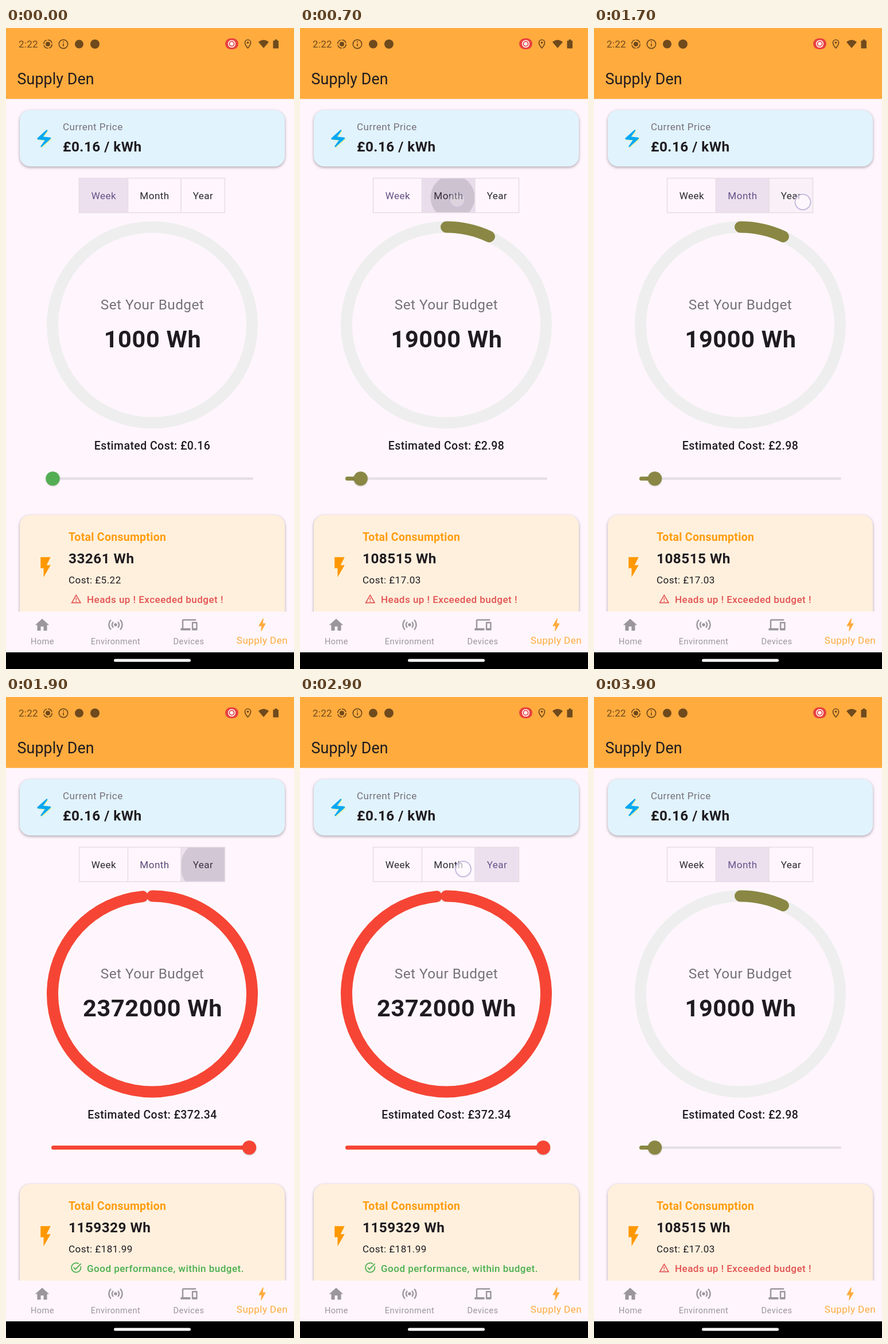
Write an HTML page that moves like this. It is 502 px wide and 1116 px high and loops after 4000 ms.

```html
<!DOCTYPE html>
<html lang="en">
<head>
<meta charset="utf-8">
<title>Supply Den</title>
<style>
  html, body { margin: 0; width: 100%; height: 100%; overflow: hidden; background: #fef6fc; }
  svg { display: block; width: 502px; height: 1116px; }
  text { font-family: Roboto, sans-serif; letter-spacing: .43px; fill: #1f1b20; white-space: pre; }
  .mid { text-anchor: middle; }
  .s { font-size: 17.1px; }
  .m { font-size: 19.5px; font-weight: 500; }
  .l { font-size: 24.4px; }
  .xl { font-size: 41.5px; font-weight: 700; letter-spacing: .65px; }
  .nav { font-size: 14.6px; fill: #9b969c; }
  .b { font-weight: 700; }
  .w5 { font-weight: 500; }
  .grey { fill: #77717a; }
  .card { filter: drop-shadow(0 2.5px 2px rgba(60, 45, 70, .28)) drop-shadow(0 1px 2.5px rgba(60, 45, 70, .16)); }
  .thumb { filter: drop-shadow(0 1px 1px rgba(0, 0, 0, .22)); }
  .status { fill: #6f4a1c; }
  .line { fill: none; stroke: #6f4a1c; stroke-width: 1.7; }
</style>
</head>
<body>
<svg viewBox="0 0 502 1116">
  <defs><clipPath id="clip"><rect id="clipBox" y="262" height="59.5"/></clipPath></defs>
  <rect width="502" height="1116" fill="#fef6fc"/>
  <rect width="502" height="123.5" fill="#ffab3e"/>

  <!-- status bar -->
  <text x="22" y="34" class="s status" style="letter-spacing:.2px">2:22</text>
  <circle cx="73" cy="28" r="7.2" class="line" stroke-dasharray="9.3 2"/>
  <circle cx="73" cy="28" r="4" class="status"/>
  <circle cx="100" cy="28" r="7.7" class="line"/>
  <path d="M100 27v5M100 23.3v2" class="line"/>
  <circle cx="127.5" cy="28" r="7.5" class="status"/>
  <circle cx="155" cy="28" r="8" class="status"/>
  <rect x="382" y="18" width="23" height="19" rx="9.5" fill="#e8413f"/>
  <circle cx="393.5" cy="27.5" r="5.8" fill="none" stroke="#fff" stroke-width="1.5"/>
  <circle cx="393.5" cy="27.5" r="3.2" fill="#fff"/>
  <path d="M421.5 20.5c-3 0-5 2.3-5 5 0 4 5 9.5 5 9.5s5-5.5 5-9.5c0-2.7-2-5-5-5z" class="line"/>
  <circle cx="421.5" cy="25.5" r="1.8" class="status"/>
  <path d="M440 24.5Q449 17 458 24.5L449 35z" class="status"/>
  <path d="M468.5 20h4v2h2.5v13.5h-9.5V22h3z" class="status"/>
  <text x="19.5" y="98" style="font-size:26.8px;letter-spacing:.1px">Supply Den</text>

  <!-- price -->
  <rect x="24" y="143" width="462" height="98" rx="18" fill="#e1f3fd" class="card"/>
  <g id="priceIcon"></g>
  <text x="99" y="178" class="s grey">Current Price</text>
  <text x="99" y="215" class="l b">£0.16 / kWh</text>

  <!-- period switch -->
  <rect id="chosen" y="262" height="59.5" fill="#ece0ee"/>
  <rect id="glow" y="262" height="59.5" fill="#1d1b20"/>
  <g clip-path="url(#clip)"><circle id="ripple" fill="#1d1b20"/></g>
  <path d="M127.5 261.5h254v60h-254zM212.5 261.5v60M305 261.5v60" fill="none" stroke="#e5dce6" stroke-width="1.5"/>
  <g id="tabs"></g>

  <!-- budget -->
  <ellipse cx="255" cy="517" rx="174" ry="170.5" fill="none" stroke="#eee" stroke-width="20"/>
  <path id="arc" d="M255 346.5a174 170.5 0 0 1 0 341a174 170.5 0 0 1 0-341" pathLength="360" fill="none" stroke-width="20" stroke-linecap="round"/>
  <text x="255" y="490" class="l mid grey">Set Your Budget</text>
  <text id="budget" x="255.5" y="555.5" class="xl mid"></text>
  <text id="estimate" x="255" y="734" class="m mid"></text>
  <rect x="79" y="782.5" width="352" height="4" rx="2" fill="#e4dde5"/>
  <rect id="track" x="79" y="781" height="7" rx="3.5"/>
  <circle id="thumb" cy="784.5" r="12.2" class="thumb"/>

  <!-- consumption -->
  <rect x="24" y="848" width="462" height="220" rx="18" fill="#fff0dd" class="card"/>
  <g id="useIcon"></g>
  <text x="109" y="893" class="m b" style="fill:#ff9d10;letter-spacing:.28px">Total Consumption</text>
  <text id="used" x="109" y="931.5" class="l b"></text>
  <text id="cost" x="109" y="967" class="s"></text>
  <g id="noteIcon"></g>
  <text id="note" x="141" y="1000.5" class="s w5"></text>

  <!-- navigation -->
  <rect y="1016" width="502" height="71" fill="#fef6fc"/>
  <g id="navIcons"></g>
  <circle cx="191" cy="1039" r="2.7" fill="#9b969c"/>
  <path d="M187 1034a7 7 0 0 0 0 10M195 1034a7 7 0 0 1 0 10M183 1030.5a12 12 0 0 0 0 17M199 1030.5a12 12 0 0 1 0 17" fill="none" stroke="#9b969c" stroke-width="2.4"/>
  <text x="63.5" y="1072.5" class="nav mid">Home</text>
  <text x="191" y="1072.5" class="nav mid">Environment</text>
  <text x="318.5" y="1072.5" class="nav mid">Devices</text>
  <text x="446.5" y="1072" class="s mid" style="fill:#ffab3e">Supply Den</text>
  <rect y="1087" width="502" height="29"/>
  <rect x="188" y="1098.5" width="134" height="5" rx="2.5" fill="#fff"/>

  <circle id="touch" r="13.5" fill="#fffaff" fill-opacity=".65" stroke="#c5bce0" stroke-width="2"/>
</svg>
<script>
const LOOP = 4000, STEP = 100;
const $ = id => document.getElementById(id);
const set = (id, attrs) => { for (const k in attrs) $(id).setAttribute(k, attrs[k]); };
const clamp = v => Math.min(1, Math.max(0, v));
const lerp = (a, b, k) => a + (b - a) * k;
const smooth = k => k * k * (3 - 2 * k);
const easeOut = k => 1 - (1 - k) ** 2;

const ICONS = {
  spark: 'M14.69 2.21L4.33 11.49c-.64.58-.28 1.65.58 1.73L13 14l-4.85 6.76c-.22.31-.19.74.08 1.01.3.3.77.31 1.08.02l10.36-9.28c.64-.58.28-1.65-.58-1.73L11 10l4.85-6.76c.22-.31.19-.74-.08-1.01-.3-.3-.77-.31-1.08-.02z',
  flash: 'M7 2v11h3v9l7-12h-4l4-8z',
  home: 'M10 20v-6h4v6h5v-8h3L12 3 2 12h3v8z',
  devices: 'M4 6h18V4H4c-1.1 0-2 .9-2 2v11H0v3h14v-3H4V6zm19 2h-6c-.55 0-1 .45-1 1v10c0 .55.45 1 1 1h6c.55 0 1-.45 1-1V9c0-.55-.45-1-1-1zm-1 9h-4v-7h4v7z',
  bolt: 'M11 21h-1l1-7H7.5c-.58 0-.57-.32-.31-.78C8.48 10.94 10.42 7.54 13 3h1l-1 7h3.5c.49 0 .56.33.47.51L16.9 10.66C12.96 17.55 11 21 11 21z',
  warn: 'M12 5.99L19.53 19H4.47L12 5.99M12 2L1 21h22L12 2zm1 14h-2v2h2v-2zm0-6h-2v4h2v-4z',
  ok: 'M22 5.18L10.59 16.6l-4.24-4.24 1.41-1.41 2.83 2.83 10-10L22 5.18zm-2.21 5.04c.13.57.21 1.17.21 1.78 0 4.42-3.58 8-8 8s-8-3.58-8-8 3.58-8 8-8c1.58 0 3.04.46 4.28 1.25l1.44-1.44C16.1 2.67 14.13 2 12 2 6.48 2 2 6.48 2 12s4.48 10 10 10 10-4.48 10-10c0-1.19-.22-2.33-.6-3.39l-1.61 1.61z'
};
const icon = (name, x, y, scale, fill) =>
  `<path d="${ICONS[name]}" fill="${fill}" transform="translate(${x} ${y}) scale(${scale}) translate(-12 -12)"/>`;

const GREY = '#9b969c', ORANGE = '#ffab3e';
$('priceIcon').innerHTML = icon('spark', 67.5, 193.5, 1.5, '#e9f3a0') + icon('spark', 66.3, 192.3, 1.5, '#07a8f3');
$('useIcon').innerHTML = icon('flash', 69, 938.7, 1.75, '#ff9800');
$('navIcons').innerHTML = icon('home', 63, 1039.5, 1.22, GREY) +
  icon('devices', 319, 1039, 1.22, GREY) + icon('bolt', 446.5, 1039, 1.22, ORANGE);

const CELLS = [
  { name: 'Week', x: 128, w: 84.5, mid: 170.5 },
  { name: 'Month', x: 212.5, w: 92.5, mid: 259 },
  { name: 'Year', x: 305, w: 76.5, mid: 343.5 }
];
$('tabs').innerHTML = CELLS.map(c => `<text x="${c.mid}" y="298" class="s mid">${c.name}</text>`).join('');
const tabs = [...$('tabs').children];

const PERIODS = [
  { budget: 1000, price: '0.16', used: 33261, cost: '5.22', level: 0, thumb: 81.5, color: '#53ae53' },
  { budget: 19000, price: '2.98', used: 108515, cost: '17.03', level: .0715, thumb: 106, color: '#8a8744' },
  { budget: 2372000, price: '372.34', used: 1159329, cost: '181.99', level: .984, thumb: 424, color: '#f64535' }
];

// press and lift bound the finger; the period switches at release
const TAPS = [
  { from: 0, to: 1, x: 274, y: 299, press: 480, release: 630, lift: 790 },
  { from: 1, to: 2, x: 364, y: 303, press: 1580, release: 1800, lift: 1900 },
  { from: 2, to: 1, x: 284.5, y: 299.5, press: 2820, release: 3467, lift: 3600 }
];

function showPeriod(p) {
  $('budget').textContent = p.budget + ' Wh';
  $('estimate').textContent = 'Estimated Cost: £' + p.price;
  $('used').textContent = p.used + ' Wh';
  $('cost').textContent = 'Cost: £' + p.cost;
  const over = p.used > p.budget, tone = over ? '#e25252' : '#4caf50';
  $('note').textContent = over ? 'Heads up ! Exceeded budget !' : 'Good performance, within budget.';
  $('note').style.fill = tone;
  $('noteIcon').innerHTML = over ? icon('warn', 122.3, 994, .82, tone) : icon('ok', 122.3, 993.5, .9, tone);
  set('arc', { stroke: p.color, 'stroke-dasharray': `${p.level * 360} 999`, visibility: p.level ? 'visible' : 'hidden' });
  set('track', { fill: p.color });
  set('thumb', { fill: p.color });
}

const INK = [45, 40, 48], PURPLE = [103, 82, 138];
const tint = k => `rgb(${INK.map((v, i) => Math.round(lerp(v, PURPLE[i], k)))})`;
let shown = -1;

function draw(t) {
  const last = TAPS.filter(a => t >= a.release).pop();
  const now = last ? last.to : 0;
  if (now !== shown) showPeriod(PERIODS[shown = now]);

  const since = last ? t - last.release : 0;
  const x = last ? lerp(PERIODS[last.from].thumb, PERIODS[now].thumb, smooth(clamp(since / 75))) : PERIODS[0].thumb;
  set('thumb', { cx: x });
  set('track', { width: x - 79 });
  set('chosen', { x: CELLS[now].x, width: CELLS[now].w });

  const fade = last ? clamp((since - 60) / 180) : 1;
  tabs.forEach((el, i) => {
    const k = i === now ? fade : last && i === last.from ? 1 - fade : 0;
    el.style.fill = tint(k);
  });

  const tap = TAPS.find(a => t >= a.press && t < a.release + 400);
  if (!tap) {
    for (const id of ['touch', 'ripple', 'glow']) set(id, { opacity: 0 });
    return;
  }
  const after = t - tap.release, cell = CELLS[tap.to];
  const grow = easeOut(clamp(after / 225));
  set('clipBox', { x: cell.x, width: cell.w });
  set('glow', {
    x: cell.x, width: cell.w,
    opacity: .036 * clamp((t - tap.press - 80) / 80) * (1 - clamp(after / 100))
  });
  set('ripple', {
    cx: lerp(tap.x, cell.mid, grow), cy: lerp(tap.y, 291.5, grow), r: lerp(16, 59, grow),
    opacity: .135 * clamp((after + 60) / 75) * (1 - clamp((after - 75) / 260))
  });
  set('touch', {
    cx: tap.x, cy: tap.y,
    opacity: t >= tap.lift ? 0 : clamp((t - tap.press) / 60) * (1 - .55 * clamp(after / 70))
  });
}

const start = performance.now();
function tick() {
  const ms = (performance.now() - start) % LOOP;
  draw(Math.floor(ms / STEP) * STEP);
  requestAnimationFrame(tick);
}
tick();
</script>
</body>
</html>
```
